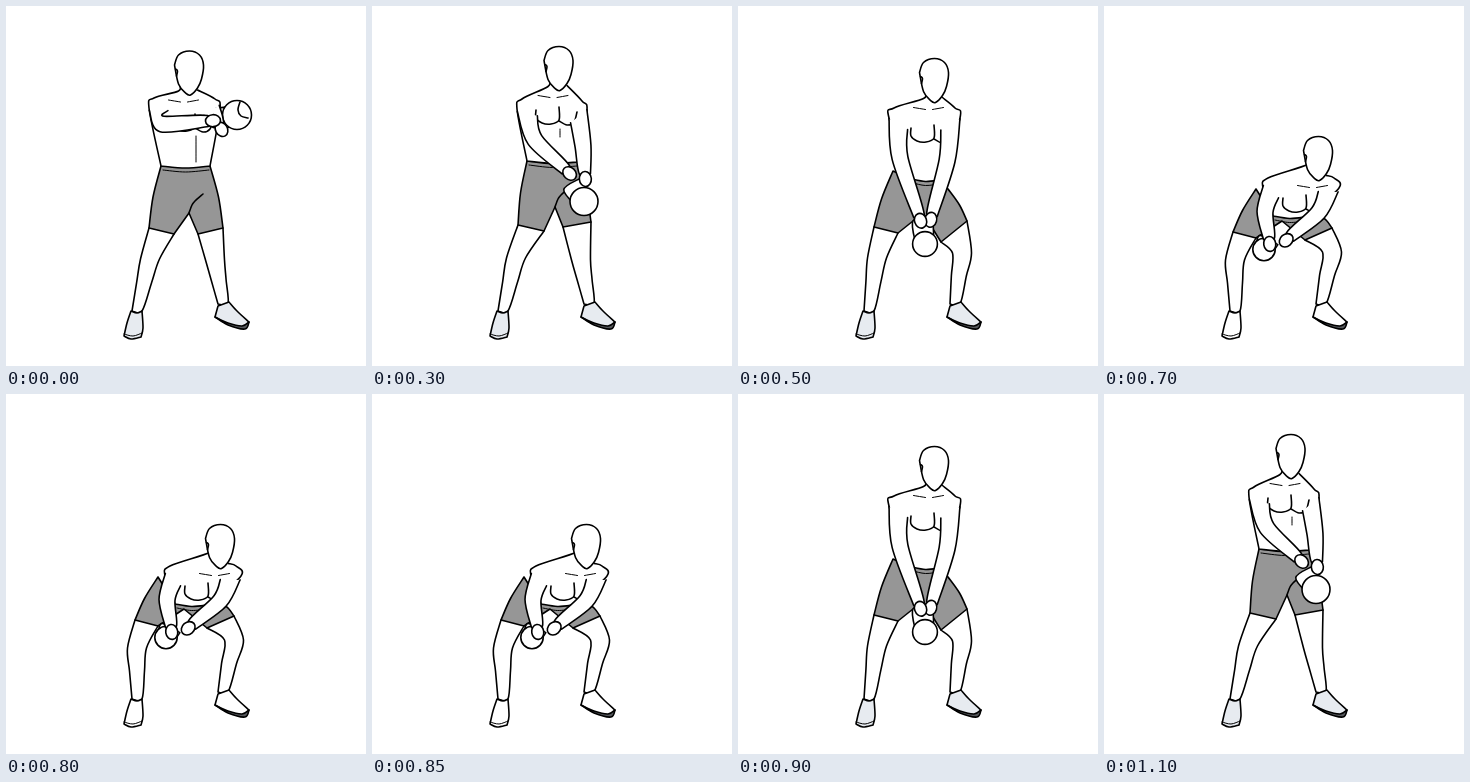
An HTML page that plays this animation: 360x360 px, repeating every 1300 ms.

```html
<!DOCTYPE html>
<html lang="en">
<head>
<meta charset="utf-8">
<title>Kettlebell swing</title>
<style>
html, body { margin: 0; width: 100%; height: 100%; overflow: hidden; background: #fff; }
svg { display: block; width: 100vw; height: 100vh; }
path, ellipse { stroke: #000; stroke-width: 1.6; stroke-linecap: round; stroke-linejoin: round; }
.skin { fill: #fff; }
.line, .thin { fill: none; }
.thin { stroke-width: 1; }
.shorts { fill: #969696; }
.shoe { fill: #e7ebf0; }
.sole { fill: #55585c; }
#bottom .shoe { fill: #fff; }
</style>
</head>
<body>
<svg id="stage" viewBox="0 0 360 360"></svg>
<script>
const LOOP = 1300;
const LEFT = -1, RIGHT = 1;
const ANKLES = [[131, 305], [217, 298]];
const stage = document.getElementById('stage');

// Joints of each pose; pairs are listed left, right.
const poses = {
  top: {
    head: [168.5, 45], neck: 40, sternum: [190, 119], abs: 26,
    arms: [[[152, 102], [156, 118], [202, 115]], [[205, 103], [209, 112], [213, 119]]],
    waist: [[155, 160], [204, 160]], hips: [[155, 160], [204, 160]], crotch: [183, 207],
    hems: [[[143, 222], [168, 228]], [[192, 228], [217, 222]]], knees: [[144, 253], [209, 254]],
    bell: [231, 109], size: 14.5, grip: [212, 112]
  },
  middle: {
    head: [172, 40.5], neck: 40, sternum: [188, 112], abs: 8,
    arms: [[[154, 103], [163, 134], [194, 164]], [[206, 105], [211, 140], [213, 168]]],
    waist: [[155, 155], [206, 156]], hips: [[155, 155], [206, 156]], crotch: [183, 201],
    hems: [[[146, 219], [172, 225]], [[191, 221], [219, 216]]], knees: [[144, 252], [209, 254]],
    bell: [212, 195.5], size: 14, grip: [200, 178]
  },
  low: {
    head: [181.5, 52.5], neck: 40, sternum: [197, 130], abs: 0,
    arms: [[[160, 112], [162, 152], [181, 210]], [[213, 112], [209, 155], [194, 209]]],
    waist: [[173, 173], [202, 174]], hips: [[155, 165], [210, 183]], crotch: [185, 207],
    hems: [[[136, 221], [160, 227]], [[203, 236], [229, 215]]], knees: [[139, 252], [224, 247]],
    bell: [187, 238], size: 12.4, grip: [185, 214]
  },
  bottom: {
    head: [199.5, 130.5], neck: 28, sternum: [203, 200], abs: 0,
    arms: [[[168, 182], [161, 206], [165, 233]], [[226, 182], [214, 207], [186, 231]]],
    waist: [[169, 210], [202, 211]], hips: [[152, 183], [213, 207]], crotch: [178, 215],
    hems: [[[129, 226], [152, 232]], [[201, 234], [228, 222]]], knees: [[131, 254], [228, 246]],
    bell: [160, 243.5], size: 11.2, grip: [165, 234]
  }
};

const steps = [
  [0, 'top'], [300, 'middle'], [500, 'low'], [700, 'bottom'],
  [900, 'low'], [1100, 'middle'], [LOOP, 'top']
];

const mix = (a, b, t) => a.map((v, k) => v + (b[k] - v) * t);
const shift = ([x, y], dx, dy) => [x + dx, y + dy];
const along = ([x, y], [dx, dy], r) => [x + dx * r, y + dy * r];
const normal = ([dx, dy]) => [-dy, dx];
const points = (text, origin = [0, 0]) =>
  text.split(' ').map(p => shift(origin, ...p.split(',').map(Number)));

function direction(a, b) {
  const length = Math.hypot(b[0] - a[0], b[1] - a[1]);
  return [(b[0] - a[0]) / length, (b[1] - a[1]) / length];
}

// Smooth runs of points that meet in sharp corners.
function curve(...runs) {
  let d = '', last = null;
  for (const run of runs) {
    const p = last ? [last, ...run] : run;
    if (!last) d = 'M' + p[0];
    for (let i = 0; i < p.length - 1; i++) {
      const a = p[i - 1] || p[i], b = p[i], c = p[i + 1], e = p[i + 2] || c;
      d += `C${along(b, [c[0] - a[0], c[1] - a[1]], 1 / 6)} ${along(c, [b[0] - e[0], b[1] - e[1]], 1 / 6)} ${c}`;
    }
    last = p[p.length - 1];
  }
  return d;
}

function add(parent, tag, attrs) {
  const el = document.createElementNS('http://www.w3.org/2000/svg', tag);
  for (const key in attrs) el.setAttribute(key, attrs[key]);
  return parent.appendChild(el);
}

function drawPose(name, pose) {
  const group = add(stage, 'g', { id: name });
  const draw = (kind, ...runs) => add(group, 'path', { class: kind, d: curve(...runs) });
  const oval = ([cx, cy], rx, ry, turn = 0) =>
    add(group, 'ellipse', { class: 'skin', cx, cy, rx, ry, transform: `rotate(${turn} ${cx} ${cy})` });
  const { head, sternum, waist, hips, hems, crotch, bell, size, grip } = pose;

  function leg(i) {
    const knee = pose.knees[i], ankle = ANKLES[i];
    const edge = side => [
      shift(knee, side * 9.5, 0),
      shift(mix(knee, ankle, .45), side * 7.5, 0),
      shift(ankle, side * 5, 0)
    ];
    draw('skin', [hems[i][0], ...edge(LEFT)], [...edge(RIGHT).reverse(), hems[i][1]]);
  }

  function feet() {
    draw('shoe', points('125,305 121,317 118,330'), points('125,333 135,331'), points('137,322 136,305'), points('131,307 125,305'));
    draw('thin', points('118,328 127,330 136,327'));
    draw('shoe', points('212,300 223,296'), points('231,305 243,316'), points('237,322 222,318 209,311'), points('212,300'));
    draw('sole', points('209,311 222,317 236,320 243,316'), points('239,323 222,319 209,311'));
  }

  function shorts() {
    const [left, right] = [0, 1].map(i => shift(mix(hips[i], hems[i][i], .5), i ? 2 : -2, 0));
    draw('shorts', [hips[0], left, hems[0][0]], [hems[0][1]], [crotch], [hems[1][0]], [hems[1][1]],
      [right, hips[1]], [waist[1]], [waist[0]], [hips[0]]);
    draw('thin', [shift(waist[0], 2, 4), shift(mix(...waist, .5), 0, 6), shift(waist[1], -1, 4)]);
    if (pose.abs) draw('line', points('14,-19 6,-12 3,-8 0,0', crotch));
  }

  function torso() {
    const [left, right] = pose.arms.map(arm => arm[0]);
    draw('skin',
      [shift(head, 5, pose.neck - 7), shift(head, 4, pose.neck), shift(left, -4, -10), shift(left, -9, 0), waist[0]],
      [shift(mix(...waist, .5), 0, 2), waist[1]],
      [shift(right, 9, 0), shift(right, 4, -10), shift(head, 23, 39)]);
    draw('line', points('-24,-8 -24,0 -18,5 -9,6 -1,2 -1,-11', sternum));
    draw('line', points('-1,3 7,7 14,4 17,-6', sternum));
    draw('thin', points('-6,49 6,51', head));
    draw('thin', points('13,51 24,49', head));
    if (pose.abs) draw('thin', [shift(sternum, 0, 11), shift(sternum, 0, 11 + pose.abs)]);
  }

  function face() {
    draw('skin', points('0,14 4,4 15,0 25,4 29,14 27,28 23,37 16,44 11,42 4,33 0,14', head));
    draw('line', points('1,18 3,20 2,25', head));
  }

  function arm([shoulder, elbow, wrist], side) {
    const upper = direction(shoulder, elbow), bend = direction(shoulder, wrist), lower = direction(elbow, wrist);
    const edge = (start, s) => [
      along(start, normal(upper), -9 * s),
      along(elbow, normal(bend), -8 * s),
      along(wrist, normal(lower), -5.5 * s)
    ];
    draw('skin', edge(shoulder, side), edge(mix(shoulder, elbow, .3), -side).reverse());
  }

  function kettlebell() {
    const d = direction(bell, grip), n = normal(d);
    draw('skin', [along(bell, n, 9), along(grip, n, 10)], [along(grip, n, -10), along(bell, n, -9)]);
    oval(bell, size, size);
    if (name === 'top') draw('line', points('3,-13 1,-5 4,1 11,3', bell));
  }

  function hand([, elbow, wrist]) {
    const d = direction(elbow, wrist);
    oval(along(wrist, d, 5), 7.5, 6, Math.atan2(d[1], d[0]) * 180 / Math.PI);
  }

  leg(0);
  leg(1);
  feet();
  shorts();
  torso();
  face();
  kettlebell();
  arm(pose.arms[1], RIGHT);
  hand(pose.arms[1]);
  arm(pose.arms[0], LEFT);
  hand(pose.arms[0]);
  return group;
}

for (const name in poses) {
  drawPose(name, poses[name]).animate(
    steps.map(([time, pose]) => ({ offset: time / LOOP, opacity: pose === name ? 1 : 0, easing: 'step-end' })),
    { duration: LOOP, iterations: Infinity }
  );
}
</script>
</body>
</html>
```
